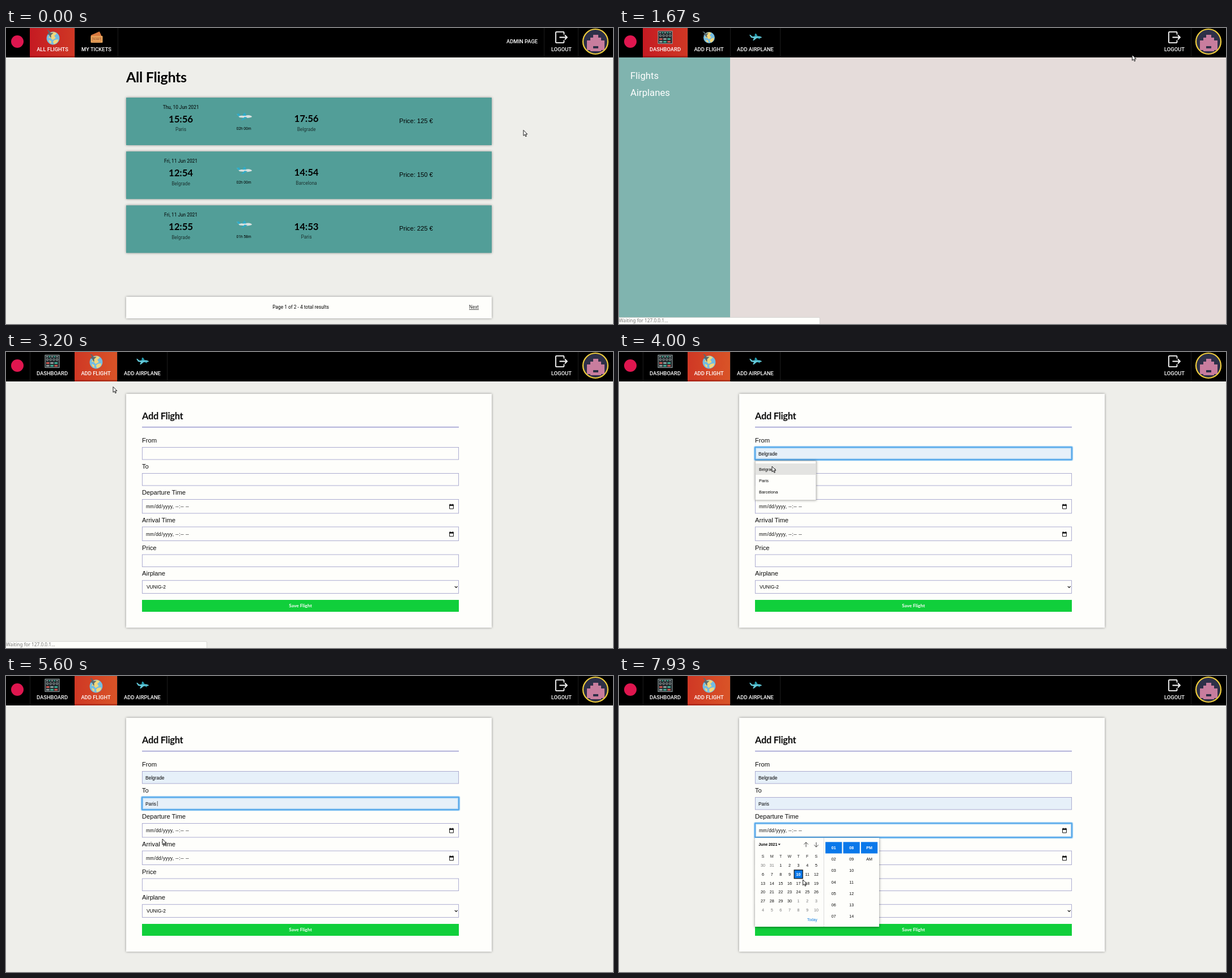
Write an HTML page that moves like this. It is 1071 by 523 pixels and loops after 8000 ms.

```html
<!DOCTYPE html>
<html lang="en">
<head>
<meta charset="utf-8">
<title>Flight booking</title>
<style>
html, body { margin: 0; width: 100%; height: 100%; overflow: hidden; background: #eeeeea; }
svg { display: block; width: 1071px; height: 523px; }
text { white-space: pre; }
.roboto { font-family: Roboto, sans-serif; }
.lato { font-family: Lato, sans-serif; font-weight: 700; }
.arial { font-family: "Liberation Sans", Arial, sans-serif; }
.status { font-family: "Noto Sans", sans-serif; }
.nav { font: 500 9.37px Roboto, sans-serif; fill: #fff; }
.shadow { filter: drop-shadow(0 0 2px #0006); }
.popup { filter: drop-shadow(0 1px 2.5px #0007); }
</style>
</head>
<body>
<svg id="stage" viewBox="0 0 1071 523" xmlns="http://www.w3.org/2000/svg"></svg>
<script>
const WHITE = '#fefefb', INK = '#0b0b0b', BLUE = '#0a78ea', FILLED = '#e6f0f9';
const stage = document.getElementById('stage');
const range = n => [...Array(n).keys()];
const each = (n, draw) => range(n).map(draw).join('');

const rect = (x, y, w, h, fill, more = '') =>
  `<rect x="${x}" y="${y}" width="${w}" height="${h}" fill="${fill}" ${more}/>`;
const text = (x, y, size, font, str, more = '') =>
  `<text x="${x}" y="${y}" font-size="${size}" class="${font}" ${more}>${str}</text>`;
const mid = (x, y, size, font, str, more = '') =>
  text(x, y, size, font, str, 'text-anchor="middle" ' + more);
const path = (d, fill, more = '') => `<path d="${d}" fill="${fill}" ${more}/>`;
const group = (id, body) => `<g id="${id}">${body}</g>`;
const at = (x, y, body, more = '') => `<g transform="translate(${x} ${y}) ${more}">${body}</g>`;

// Icons, drawn around their own centre
const globe = `<circle r="10" fill="#74bde2"/>` +
  path('M-5 -8Q1 -11 4 -8L1 -4 4 -1 0 3 -4 0-7 1Z M3 2 8 0Q10 5 3 9L1 5Z M-6 4-2 5-1 9Q-5 8-6 4Z', '#f3d77c') +
  path('M-12 -11 -8 -10 -6 -7 -1 -8 -4 -4 -3 0 -5 -1 -7 -4 -10 -4 -8 -7Z', '#586a70');
const ticket =
  `<g transform="rotate(-24)">${rect(-8, -8, 17, 9, '#d9793f', 'rx="1"')}</g>` +
  rect(-10.5, -3, 21, 12, '#eba65d', 'rx="1"') +
  rect(-7.5, -.5, 15, 7, 'none', 'stroke="#b5602f" stroke-width=".6"') +
  mid(0, 4.4, 4, 'arial', 'TICKET', 'fill="#8d4526" font-weight="700"');
const panel = rect(-12.5, -11, 25, 22, '#20272b', 'stroke="#8f9b9b" stroke-width="1.2"') +
  each(4, i => `<circle cx="${-8.5 + i * 5.7}" cy="-3" r="1.7" fill="none" stroke="#a8b3b1"/>`) +
  each(5, i => rect(-10.5 + i * 4.4, -9.3, 3, 2.2, i % 2 ? '#3eaa91' : '#8f9b9b')) +
  each(3, i => rect(-10.5 + i * 7.2, 1.5, 5.6, 3, ['#c7564f', '#8f9b9b', '#3eaa91'][i])) +
  each(3, i => rect(-10.5 + i * 7.2, 6.3, 5.6, 3, ['#8f9b9b', '#3eaa91', '#c7564f'][i]));
const jet = path('M-11 -4 -9 -4 -6 -1 5 -1.5Q11 -1 11 1 7 2.5 2 2L-3 6-5 6-3 2-8 1Z', '#63c8d8') +
  path('M-2 -1 -1 -6 1 -6 4 -1Z M2 1 8 4 7 1Z', '#2598ab');
const liner = path('M-13 -4 -11 -4 -8 -1 8 -2Q14 -1 14 1 10 3 3 3L-8 2Z', '#d8e0df') +
  path('M-13 -4 -9 -5 -6 -1 -10 0Z M-3 -1 0 -6 2 -6 4 -1Z M1 1 -5 7-3 7 6 2Z', '#2eabc8');
const door = path('M4.5 -5V-8.5Q4.5 -9.6 3.4 -9.6H-9Q-10 -9.6 -10 -8.6V8.6Q-10 9.6 -9 9.6H3.4Q4.5 9.6 4.5 8.5V5 M-3.5 0H10 M6 -4L10 0 6 4',
  'none', 'stroke="#fff" stroke-width="1.8"');
const calendar = path('M-3.4 -3H3.4V4H-3.4Z', 'none', 'stroke="#111" stroke-width="1"') +
  rect(-3.9, -3.5, 7.8, 2.4, '#111') + rect(-2.9, -4.6, 1.1, 2, '#111') + rect(1.8, -4.6, 1.1, 2, '#111');

const avatar = `<circle cx="1040" cy="24" r="22" fill="#2e3048"/>` +
  rect(1036, 12, 9, 6, '#c87d9e') + rect(1031, 17, 19, 6, '#c87d9e') + rect(1025, 22, 31, 17, '#c87d9e') +
  rect(1036, 32, 9, 4, '#2e3048') + rect(1031, 38, 19, 3, '#c87d9e') +
  `<circle cx="1040" cy="24" r="22" fill="none" stroke="#f0ce3c" stroke-width="2.2"/>`;

// Navigation
const tab = (x, w) => rect(x, 0, w, 52, 'url(#heat)') + rect(x, 49.5, w, 2.5, '#7d0b0b', 'opacity=".45"');
const divider = x => rect(x, 0, 1, 52, '#1b1b1b');
const label = (x, str, y = 41.3) => `<text x="${x}" y="${y}" class="nav" text-anchor="middle">${str}</text>`;
const globeAt = (x, big) => at(x, big ? 18 : 17, globe, big ? 'scale(1.14) rotate(12)' : '');
const bar = rect(0, 0, 1071, 52, '#000') + `<circle cx="20" cy="24" r="11" fill="#df164f"/>` +
  [42, 121, 1009].map(divider).join('') + at(980, 16.5, door) + label(980, 'LOGOUT') + avatar;
const adminNav = at(81.5, 16.5, panel) + label(81.5, 'DASHBOARD') + label(158.5, 'ADD FLIGHT') +
  at(241, 16, jet) + label(240.5, 'ADD AIRPLANE') + divider(196) + divider(284);

// Flight list
const flights = [
  ['Thu, 10 Jun 2021', '15:56', 'Paris', '02h 00m', '17:56', 'Belgrade', 125],
  ['Fri, 11 Jun 2021', '12:54', 'Belgrade', '02h 00m', '14:54', 'Barcelona', 150],
  ['Fri, 11 Jun 2021', '12:55', 'Belgrade', '01h 58m', '14:53', 'Paris', 225]];
const flightCard = ([date, start, from, length, end, to, price], i) => at(0, i * 95.2,
  rect(212, 123, 645, 84, '#529e98', 'class="shadow"') +
  mid(308.5, 142.8, 8.3, 'roboto', date) +
  mid(308.5, 166.7, 16.74, 'lato', start) + mid(308.5, 182.4, 8.37, 'roboto', from, 'fill="#1d3432"') +
  at(420, 156, liner) + mid(419.5, 180.3, 6.7, 'roboto', length) +
  mid(530, 166.2, 16.74, 'lato', end) + mid(530, 182, 8.37, 'roboto', to, 'fill="#1d3432"') +
  mid(723.5, 168, 11.16, 'arial', `Price: ${price} €`));
const listPage = rect(0, 52, 1071, 471, '#eeeeea') +
  text(212, 96, 25, 'lato', 'All Flights', 'letter-spacing="-.27"') +
  flights.map(flightCard).join('') +
  rect(212, 475, 645, 38, WHITE, 'class="shadow"') +
  mid(520, 496, 8.37, 'roboto', 'Page 1 of 2 - 4 total results') +
  text(817, 496, 8.37, 'roboto', 'Next', 'fill="#333" text-decoration="underline"') +
  tab(42, 79) + group('adminHover', tab(871, 78)) + globeAt(83, true) + label(82, 'ALL FLIGHTS') +
  at(160, 17, ticket) + label(159.5, 'MY TICKETS') + label(910.5, 'ADMIN PAGE', 27.3) +
  divider(197) + divider(949);

const dashboardPage = rect(0, 52, 196, 471, '#80b4af') + rect(196, 52, 875, 471, '#e5dcda') +
  text(20, 89.7, 16.74, 'roboto', 'Flights', 'fill="#fff"') +
  text(20, 119.8, 16.74, 'roboto', 'Airplanes', 'fill="#fff"') +
  tab(42, 79) + group('addHover', tab(121, 75)) +
  group('smallGlobe', globeAt(159, false)) + group('bigGlobe', globeAt(159, true)) + adminNav;

// Flight form
const fields = [['From', 168.5, 21.5], ['To', 214.5, 21.5], ['Departure Time', 260.5, 24.5],
  ['Arrival Time', 309, 24.5], ['Price', 358, 21.5], ['Airplane', 403.7, 22.8]];
const field = ([name, y, h], i) => text(240, y - 8.4, 11.16, 'arial', name, `fill="${INK}"`) +
  rect(240.4, y, 558.2, h, WHITE, `id="field${i}" stroke="#a3a3cc" stroke-width=".9"`);
const dateParts = ['mm', '/', 'dd', '/', 'yyyy', ', ', '--', ':', '--', ' ', '--'];
const dateField = y => text(246.4, y + 3, 8.37, 'arial',
  dateParts.map(p => `<tspan dx=".56">${p}</tspan>`).join(''), `fill="${INK}"`) + at(786, y, calendar);
const formPage = rect(0, 52, 1071, 471, '#eeeeea') + rect(212, 74, 645, 413, WHITE, 'class="shadow"') +
  text(240, 118.6, 16.4, 'lato', 'Add Flight', `letter-spacing="-.27" fill="${INK}"`) +
  rect(240, 132, 559, 1.4, '#9494cd') + fields.map(field).join('') +
  text(246, 182.6, 8.37, 'arial', '', 'id="value0"') + text(246, 228.5, 8.37, 'arial', '', 'id="value1"') +
  dateField(273) + dateField(321.8) +
  text(248, 418, 8.37, 'arial', 'VUNIG-2') +
  path('M791.8 413.8 794.2 416.3 796.6 413.8', 'none', 'stroke="#111" stroke-width="1.2"') +
  rect(240, 438, 559, 21, '#10cf3b') + mid(519.5, 451.3, 8.37, 'lato', 'Save Flight', 'fill="#fff"') +
  group('ring', [[5, .22], [3.2, .45], [1.3, 1]].map(([w, o]) =>
    rect(239.9, 0, 559.2, 0, 'none', `rx=".8" stroke="#46a3ea" stroke-width="${w}" opacity="${o}"`)).join('')) +
  rect(0, 0, .7, 9, '#111', 'id="caret"') + group('menu', '') + group('picker', pickerBody()) +
  tab(121, 75) + globeAt(159, true) + adminNav;

function pickerBody() {
  const size = 7.2, colX = c => 254 + c * 15.65;
  const day = i => {
    const n = i - 1, r = Math.floor(i / 7), inside = n >= 1 && n <= 30, chosen = n === 10;
    const num = n < 1 ? n + 31 : n > 30 ? n - 30 : n;
    const box = chosen ? rect(309.1, 342.8, 15, 15, BLUE, 'stroke="#101010" stroke-width="1.2"') : '';
    return box + mid(colX(i % 7), 337.4 + r * 15.65, size, 'arial', num,
      chosen ? 'fill="#fff" font-weight="700"' : `fill="${inside ? INK : '#777'}"`);
  };
  const column = (c, values) => values.map((v, r) => {
    const x = 364.2 + c * 31.4, y = 293.3 + r * 20.15;
    return (r ? '' : rect(x, y, 29.2, 20.2, BLUE)) +
      mid(x + 14.6, y + 12.8, size, 'arial', v, r ? `fill="${INK}"` : 'fill="#fff" font-weight="700"');
  }).join('');
  const count = from => range(7).map(i => String(from + i).padStart(2, '0'));
  const arrow = (x, dir) => path(`M${x} ${298 + 4.2 * dir}V${298 - 4.2 * dir}M${x - 3.8} ${298 - .4 * dir}L${x} ${298 - 4.2 * dir} ${x + 3.8} ${298 - .4 * dir}`,
    'none', 'stroke="#333" stroke-width=".9"');
  return rect(240, 286, 219, 157, WHITE, 'class="popup"') +
    text(246.3, 300.3, 6.8, 'arial', 'June 2021', 'font-weight="700"') +
    path('M280.6 296.6H285L282.8 299Z', '#111') + arrow(330, 1) + arrow(348, -1) +
    [...'SMTWTFS'].map((d, c) => mid(colX(c), 321, size, 'arial', d, 'fill="#222"')).join('') +
    each(42, day) + text(332, 433, 6.7, 'arial', 'Today', 'fill="#0b7be0"') +
    rect(361.2, 286, .8, 157, '#d4d4d2') +
    column(0, count(1)) + column(1, count(8)) + column(2, ['PM', 'AM']);
}

stage.innerHTML = `<defs><linearGradient id="heat" gradientUnits="userSpaceOnUse" x1="42" x2="1071">
  <stop offset="0" stop-color="#c51a22"/><stop offset=".15" stop-color="#d95427"/>
  <stop offset="1" stop-color="#f3b233"/></linearGradient></defs>` + bar +
  group('list', listPage) + group('dashboard', dashboardPage) + group('form', formPage) +
  group('status', rect(-1, 511.4, 355.3, 13, WHITE, 'rx="1.5" stroke="#c9c9c6" stroke-width=".7"') +
    text(0, 520.4, 8.25, 'status', '', 'id="statusText" fill="#777"')) +
  group('arrow', path('M0 0V9.8L2.3 7.7 3.9 11.3 5.4 10.6 3.9 7.1H6.9Z', '#fff', 'stroke="#111" stroke-width=".95"')) +
  group('beam', path('M-2.2 -5H-.5L0 -4.5 .5 -5H2.2M0 -4.5V4.5M-2.2 5H-.5L0 4.5 .5 5H2.2', 'none', 'stroke="#111" stroke-width="1.1"'));

const el = Object.fromEntries([...stage.querySelectorAll('[id]')].map(e => [e.id, e]));
const show = (name, on) => el[name].setAttribute('display', on ? 'inline' : 'none');
const move = (name, x, y) => el[name].setAttribute('transform', `translate(${x} ${y})`);

// Pointer way points: time, x, y
const route = [[0, 913, 180.5], [130, 913, 180], [200, 913, 180], [530, 925, 97], [600, 925, 97], [1130, 908, 30],
  [1530, 908, 30], [1660, 905.5, 47.5], [1930, 905.5, 48], [2000, 790, 100], [2070, 674, 128], [2200, 674, 128],
  [2330, 261, 150], [2400, 261, 150], [2930, 164.5, 28.5], [3070, 164.5, 28.5], [3200, 189, 61.5], [3600, 262, 180],
  [3930, 262, 180], [4000, 270, 202], [4130, 272, 205], [4270, 272, 205], [4530, 274, 220], [4800, 274, 222],
  [4930, 274, 222], [5000, 274, 244], [5400, 276, 288], [5870, 276, 288], [5930, 300, 296], [6130, 520, 340],
  [6330, 783, 276], [7130, 783, 275], [7930, 324.5, 360]];

function pointer(t) {
  const i = route.findIndex(p => p[0] > t);
  if (i < 0) return route[route.length - 1].slice(1);
  const [a, b] = [route[i - 1], route[i]], k = (t - a[0]) / (b[0] - a[0]);
  return [a[1] + (b[1] - a[1]) * k, a[2] + (b[2] - a[2]) * k];
}

const menus = [['Belgrade', 'Paris', 'Barcelona'], ['Barcelona', 'Belgrade', 'Paris', 'Rome', 'Madrid', 'Berlin']];
const menuBody = (items, top, active) =>
  rect(240.3, top + .4, 107.5, items.length * 20 + 9.4, WHITE, 'stroke="#b9b9b7" stroke-width=".7" class="shadow"') +
  items.map((s, i) => (i === active ? rect(240.8, top + 5 + i * 20, 106.6, 20, '#e3e3e1') : '') +
    text(247, top + 17.7 + i * 20, 7.4, 'arial', s)).join('');

function statusFor(t, admin, add) {
  if ((t >= 1395 && t < 1995) || (t >= 2995 && t < 3460)) return 'Waiting for 127.0.0.1…';
  return admin ? '127.0.0.1:8000/dashboard' : add ? '127.0.0.1:8000/add-flight' : '';
}

function drawForm(t, y) {
  const focus = t < 3660 ? -1 : t < 4790 ? 0 : t < 6525 ? 1 : 2;
  const open = t >= 3790 && t < 4325 ? 0 : t >= 4790 && t < 5595 ? 1 : -1;
  const top = open ? 238 : 192;
  const row = open < 0 ? -1 : Math.floor((y - top - 5) / 20);
  const preview = row >= 0 ? menus[open][row] : '';
  const values = [open === 0 ? preview : t >= 4325 ? 'Belgrade' : '', open === 1 ? preview : t >= 5595 ? 'Paris' : ''];
  values.forEach((v, i) => {
    el['value' + i].textContent = v;
    el['field' + i].setAttribute('fill', v ? FILLED : WHITE);
  });
  show('menu', open >= 0);
  if (open >= 0) el.menu.innerHTML = menuBody(menus[open], top, row);
  show('ring', focus >= 0);
  if (focus >= 0) for (const r of el.ring.children) {
    r.setAttribute('y', fields[focus][1] - .3);
    r.setAttribute('height', fields[focus][2] + .6);
  }
  const typedAt = focus === 0 ? 4325 : 5595;
  const caret = (focus === 0 || focus === 1) && t >= typedAt && Math.floor((t - typedAt) / 500) % 2 === 0;
  show('caret', caret);
  if (caret) move('caret', focus ? 266.8 : 280.2, focus ? 221 : 175);
  show('picker', t >= 6865);
}

function draw(now) {
  // The screen advances in fifteen steps per second
  const t = Math.floor(((now % 8000) + 5) * .015) / .015;
  const scene = t < 1595 ? 'list' : t < 3195 ? 'dashboard' : 'form';
  ['list', 'dashboard', 'form'].forEach(s => show(s, s === scene));
  const [x, y] = pointer(t);
  const admin = scene === 'list' && y < 52, add = scene === 'dashboard' && y < 52 && x < 196;
  show('adminHover', admin);
  show('addHover', add);
  show('smallGlobe', !add);
  show('bigGlobe', add);
  if (scene === 'form') drawForm(t, y);
  const message = statusFor(t, admin, add);
  show('status', message);
  el.statusText.textContent = message;
  const typing = (t >= 3530 && t < 3980) || (t >= 4320 && t < 4980);
  show('beam', typing);
  show('arrow', !typing);
  move(typing ? 'beam' : 'arrow', x, y);
}

function loop() {
  draw(performance.now());
  requestAnimationFrame(loop);
}
loop();
</script>
</body>
</html>
```
